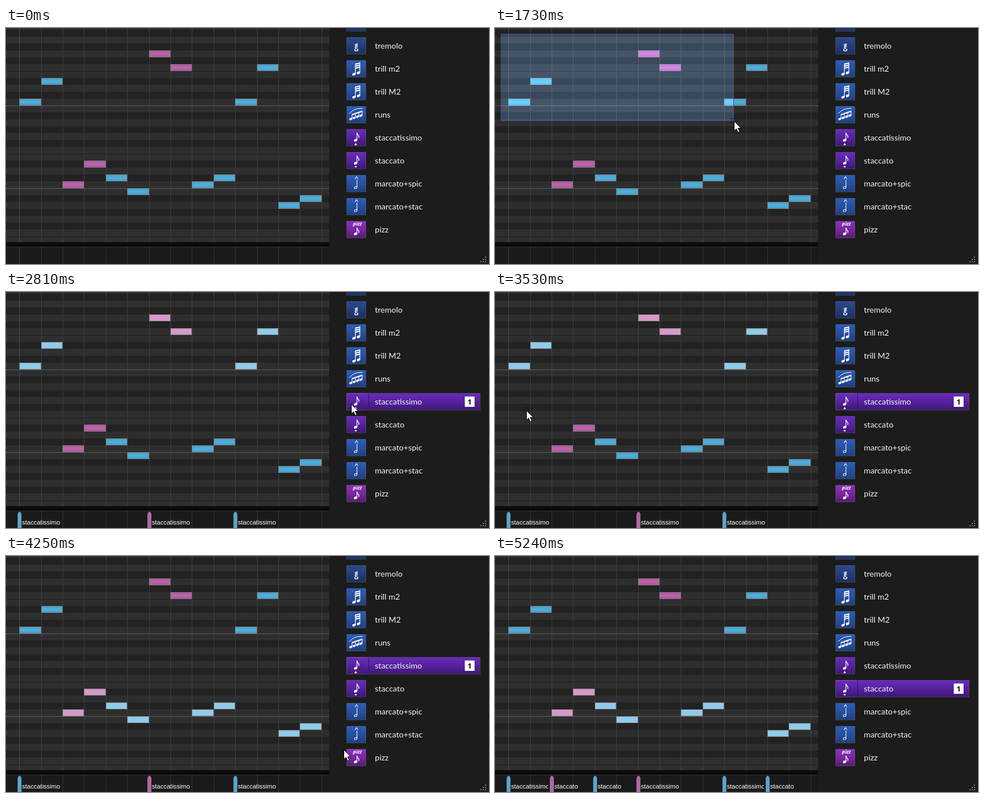
Write an HTML page that moves like this. It is 837 by 411 pixels and loops after 5.99 s.

```html
<!DOCTYPE html>
<html lang="en">
<head>
<meta charset="utf-8">
<title>Piano roll articulations</title>
<style>
html, body { margin: 0; width: 100%; height: 100%; overflow: hidden; background: #1c1c1c; }
svg { display: block; width: 837px; height: 411px; }
.name { font: 14px Lato, Carlito, sans-serif; fill: #f4f4f4; }
.tag { font: 11px "Liberation Sans", Arial, sans-serif; fill: #fff; }
.pizz { font: italic bold 8.5px "Open Sans", sans-serif; fill: #fff; }
.num { font: bold 13px "Open Sans", sans-serif; fill: #111; }
#lasso { mix-blend-mode: plus-lighter; }
</style>
</head>
<body>
<svg id="stage" viewBox="0 0 837 411" xmlns="http://www.w3.org/2000/svg"></svg>
<script>
const LOOP = 5990, START = 650, STEP = 90;
const ROLL_W = 560, ROLL_H = 373, COL = 37.4;
const stage = document.getElementById('stage');

function add(parent, tag, attrs = {}, text) {
  const el = document.createElementNS(stage.namespaceURI, tag);
  for (const key in attrs) el.setAttribute(key, attrs[key]);
  if (text) el.textContent = text;
  parent.appendChild(el);
  return el;
}
const rect = (p, x, y, width, height, fill, more) =>
  add(p, 'rect', { x, y, width, height, fill, ...more });
const path = (p, d, width = 1, more) =>
  add(p, 'path', { d, fill: 'none', stroke: '#fff', 'stroke-width': width, ...more });
const show = (el, on) => el.setAttribute('visibility', on ? 'visible' : 'hidden');
const colX = i => Math.round(23.2 + COL * i);

const defs = add(stage, 'defs');
function gradient(id, ...colors) {
  const g = add(defs, 'linearGradient', { id, x2: 0, y2: 1 });
  colors.forEach((c, i) => add(g, 'stop', { offset: i / (colors.length - 1), 'stop-color': c }));
}
gradient('blue', '#4a9cc6', '#4eb2e0', '#479cc6');
gradient('pink', '#ad569a', '#c563b0', '#aa5497');
gradient('blueSel', '#92c8e3', '#8fcdec', '#92c8e3');
gradient('pinkSel', '#d59ac6', '#da98cb', '#d59ac6');
gradient('iconBlue', '#2c5cbb', '#28509f', '#203f80');
gradient('iconDim', '#2a4a8e', '#1d3063');
gradient('iconPurple', '#6a2cbc', '#55229c', '#3f1876');
gradient('iconPizz', '#8d2fbd', '#7a289f', '#571c75');

// Piano roll background
const BLACK_KEYS = [1, 3, 6, 8, 10];
rect(stage, 0, 0, ROLL_W, ROLL_H, '#2e2e2e');
for (let y = -9, key = 11; y < ROLL_H; y += 12, key = (key + 11) % 12) {
  const h = Math.min(12, ROLL_H - y);
  if (BLACK_KEYS.includes(key)) rect(stage, 0, y, ROLL_W, h, '#222');
  if (key === 4) rect(stage, 0, y, ROLL_W, 1, '#222');
}
rect(stage, 0, 373, ROLL_W, 8, '#0b0b0b');
rect(stage, 0, 381, ROLL_W, 1, '#303030');
rect(stage, 0, 382, ROLL_W, 29, '#1a1a1a');
for (let i = 0; i < 15; i++) {
  rect(stage, colX(i), 0, 1, ROLL_H, i ? '#3f3f3f' : '#4c4c4c');
  rect(stage, colX(i), 382, 1, 29, i ? '#333' : '#444');
}
for (const y of [135, 279]) rect(stage, 0, y, ROLL_W, 1, '#5c5c5c');

// Notes, one per column
const NOTE_Y = [123, 87, 267, 231, 255, 279, 39, 63, 267, 255, 123, 63, 303, 291];
const hue = i => [2, 3, 6, 7].includes(i) ? 'pink' : 'blue';
const notes = NOTE_Y.map((y, i) => {
  const x = colX(i);
  return {
    upper: y < 200, hue: hue(i),
    el: rect(stage, x + .5, y + .5, colX(i + 1) - x - 1, 11, '', { stroke: '#80858a' })
  };
});

// Articulation tags in the bottom lane
function tag(i, name, clipAt) {
  const x = colX(i), g = add(stage, 'g');
  add(g, 'path', {
    d: `M${x - 2.5} 411V387l1.5-3.5h3l1.5 3.5v24z`,
    fill: hue(i) === 'pink' ? '#bd5fa9' : '#4aaad8', stroke: '#7b7f84'
  });
  const clip = add(defs, 'clipPath', { id: 'lane' + i });
  const width = add(clip, 'rect', { x, y: 382, width: 100, height: 29 });
  add(g, 'text', { x: x + 4.8, y: 405, class: 'tag', 'clip-path': `url(#lane${i})` }, name);
  return { g, width, clipAt };
}
const firstTags = [tag(0, 'staccatissimo', 69), tag(6, 'staccatissimo', 100), tag(10, 'staccatissimo', 69)];
const nextTags = [2, 4, 12].map(i => tag(i, 'staccato', 100));

// Icon drawings in a 34 x 30 box
const head = (p, x, y, rx = 3, ry = 2.2, more) => add(p, 'ellipse',
  { cx: x, cy: y, rx, ry, fill: '#fff', transform: `rotate(-25 ${x} ${y})`, ...more });
function eighth(p, top, y) {
  head(p, 15.8, y);
  path(p, `M18.2 ${y}V${top}q.5 3 2.5 5q1.8 2 .3 4.5`, 1.2);
}
const draw = {
  tremolo(p) {
    path(p, 'M14.5 13.5l5-2M14.5 16l5-2M14.5 18.5l5-2', 1.4);
    add(p, 'ellipse', { cx: 17, cy: 22, rx: 2.8, ry: 1.9, fill: 'none', stroke: '#fff', 'stroke-width': 1.3 });
  },
  trill(p) {
    head(p, 13, 24.5); head(p, 20.8, 22);
    path(p, 'M15.5 24V6M23.2 21.5V4', 1.2);
    path(p, 'M15 7l8.7-2M15 10.5l8.7-2M15 14l8.7-2', 2.3);
  },
  runs(p) {
    for (let i = 0; i < 4; i++) {
      const x = 7.5 + 5.8 * i, y = 22.5 - 2 * i;
      head(p, x, y, 2.7, 2);
      path(p, `M${x + 2.2} ${y}v-8`, 1);
    }
    path(p, 'M9.5 15l17.6-6', 2.2);
    path(p, 'M5 13Q13 3 28 4');
  },
  staccatissimo(p) {
    eighth(p, 6, 19.5);
    add(p, 'path', { d: 'M16 24l2.3 4h-4.6z', fill: '#fff' });
  },
  staccato(p) {
    eighth(p, 6, 19.5);
    add(p, 'circle', { cx: 16, cy: 25.5, r: 1.5, fill: '#fff' });
  },
  marcato(p) {
    head(p, 15.8, 22, 2.5, 1.8, { fill: 'none', stroke: '#fff' });
    path(p, 'M18.2 21.5V8', 1.1);
    path(p, 'M14.8 6.8L17.3 3l2.5 3.8', 1.1);
  },
  pizz(p) {
    add(p, 'text', { x: 19, y: 8, class: 'pizz', 'text-anchor': 'middle' }, 'pizz');
    eighth(p, 11.5, 22.5);
  }
};

// Articulation list
rect(stage, ROLL_W, 0, 277, 411, '#1c1c1c');
const ROWS = [
  ['tremolo', 'tremolo', 'iconDim'], ['trill m2', 'trill', 'iconBlue'], ['trill M2', 'trill', 'iconBlue'],
  ['runs', 'runs', 'iconBlue'], ['staccatissimo', 'staccatissimo', 'iconPurple'],
  ['staccato', 'staccato', 'iconPurple'], ['marcato+spic', 'marcato', 'iconBlue'],
  ['marcato+stac', 'marcato', 'iconBlue'], ['pizz', 'pizz', 'iconPizz']
];
const tile = (p, fill, width) =>
  rect(p, .5, .5, width - 1, 29, `url(#${fill})`, { stroke: '#fff', 'stroke-opacity': .14 });
tile(add(stage, 'g', { transform: 'translate(590 -24)' }), 'iconDim', 34);
const bars = ROWS.map(([name, icon, fill], i) => {
  const row = add(stage, 'g', { transform: `translate(590 ${16 + 40 * i})` });
  tile(row, fill, 34);
  const bar = add(row, 'g');
  tile(bar, fill, 232);
  rect(bar, 38, 1, 1, 28, '#35136a');
  rect(bar, 205, 6, 17, 18, '#fff');
  add(bar, 'text', { x: 213.5, y: 20, class: 'num', 'text-anchor': 'middle' }, '1');
  draw[icon](row);
  add(row, 'text', { x: 49.3, y: 20, class: 'name' }, name);
  return bar;
});
for (let r = 0; r < 3; r++)
  for (let c = 2 - r; c < 3; c++) rect(stage, 822 + 4 * c, 398 + 4 * r, 2, 2, '#777');

// Lasso and pointers
const lasso = rect(stage, 0, 0, 0, 0, '#18263a', { id: 'lasso' });
const lassoEdge = rect(stage, 0, 0, 0, 0, 'none', { stroke: '#4c4a94' });
const pointer = add(stage, 'g');
const marquee = rect(pointer, -4.5, -4.5, 9, 7, 'none', { stroke: '#080808', 'stroke-dasharray': '1 1' });
const arrow = add(pointer, 'path', {
  d: 'M.5 .5V17l3.8-3.6 2.8 6.6 2.8-1.2-2.8-6.4h5.2z', fill: '#fff', stroke: '#000'
});
const pencil = add(pointer, 'g', { transform: 'translate(4 4)' });
path(pencil, 'M.8 .8L1.3 5 8.6 12.8 12.4 9.6 5 1.6z', 1, { fill: '#fff', stroke: '#000' });
path(pencil, 'M1.3 5L5 1.6M6.8 11L10.6 7.7', 1, { stroke: '#000' });

// Pointer path: step, x, y
const PATH = [
  [0, -7, -8], [2, 3, 3], [4, 10, 10], [7, 10, 10], [8, 22, 15], [9, 80, 38], [10, 185, 78],
  [11, 315, 126], [12, 414, 162], [13, 452, 168], [14, 463, 169], [16, 468, 166], [17, 481, 162],
  [18, 515, 168], [19, 560, 179], [20, 594, 187], [21, 606, 190], [23, 606, 190], [24, 598, 195],
  [28, 320, 208], [30, 90, 208], [32, 54, 206], [33, 115, 223], [34, 255, 261], [35, 387, 292],
  [36, 470, 315], [38, 556, 331], [40, 585, 337], [42, 606, 250], [43, 608, 234], [46, 608, 234],
  [49, 600, 263], [50, 571, 310]
];
function pointAt(k) {
  const n = Math.max(1, PATH.findIndex(p => p[0] >= k));
  const [a, ax, ay] = PATH[n - 1], [b, bx, by] = PATH[n];
  const f = (k - a) / (b - a);
  return [Math.round(ax + (bx - ax) * f), Math.round(ay + (by - ay) * f)];
}
const within = (k, a, b) => k >= a && k <= b;

function render(time) {
  const k = Math.floor((time - START) / STEP);
  const live = within(k, 0, 50);
  const [x, y] = live ? pointAt(k) : [0, 0];

  const ranging = within(k, 6, 14) || within(k, 31, 38);
  const inPanel = x >= ROLL_W;
  pointer.setAttribute('transform', `translate(${x} ${y})`);
  show(marquee, live && ranging);
  show(arrow, live && (ranging || inPanel));
  show(pencil, live && !ranging && !inPanel);

  const from = within(k, 8, 14) ? [10, 10] : within(k, 33, 38) ? [54, 206] : null;
  for (const box of [lasso, lassoEdge]) {
    show(box, from);
    if (!from) continue;
    const inset = box === lassoEdge ? .5 : 0;
    box.setAttribute('x', from[0] + inset);
    box.setAttribute('y', from[1] + inset);
    box.setAttribute('width', Math.max(0, x - from[0] - 2 * inset));
    box.setAttribute('height', Math.max(0, y - from[1] - 2 * inset));
  }

  for (const n of notes) {
    const selected = n.upper ? within(k, 15, 38) : k >= 39;
    n.el.setAttribute('fill', `url(#${n.hue}${selected ? 'Sel' : ''})`);
  }

  const first = k >= 23, next = k >= 44;
  for (const t of firstTags) {
    show(t.g, first);
    t.width.setAttribute('width', next ? t.clipAt : 100);
  }
  for (const t of nextTags) show(t.g, next);
  bars.forEach((bar, i) => show(bar, i === 4 ? first && !next : i === 5 && next));
}

function tick() {
  render(performance.now() % LOOP);
  requestAnimationFrame(tick);
}
tick();
</script>
</body>
</html>
```
